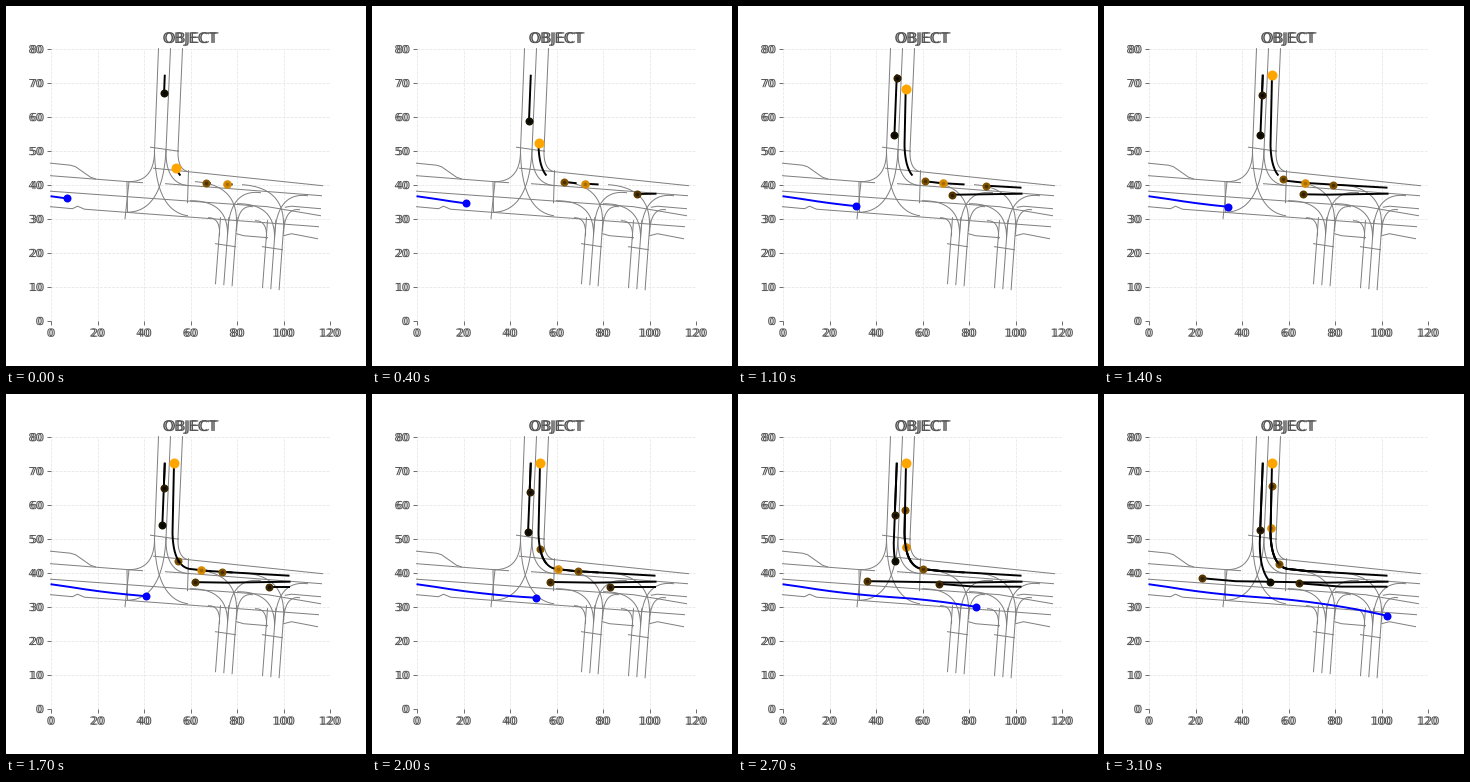
Animation of 360 by 360 pixels, one loop 3.2 s. Source, as a matplotlib script:

```python
import numpy as np
import matplotlib.pyplot as plt
from matplotlib.animation import FuncAnimation
from matplotlib.patheffects import PathPatchEffect

SIZE, DPI = 360, 100
FRAMES, STEP = 32, 100
INK = "#555555"
ROAD = "#808080"
DARK = "#7f5200"

fig = plt.figure(figsize=(SIZE / DPI, SIZE / DPI), dpi=DPI, facecolor="white")

# Chart frame: ticks, dashed grid and doubled lettering, no spines.
ax = fig.add_axes([0.125, 0.125, 0.775, 0.755])
ax.set(xlim=(0, 120), ylim=(0, 80))
ax.set_xticks(range(0, 121, 20))
ax.set_yticks(range(0, 81, 10))
ax.grid(color="#e6e6e6", linestyle="--", linewidth=0.55)
ax.tick_params(length=3, width=0.6, color=INK, labelcolor=INK, labelsize=8, pad=2.5)
ax.spines[:].set_visible(False)
title = ax.set_title("OBJECT", fontsize=10.5, color=INK, pad=4.5)
double = [PathPatchEffect(offset=(dx, 0), facecolor=INK, linewidth=0) for dx in (-0.7, 0.7)]
for text in (title, *ax.get_xticklabels(), *ax.get_yticklabels()):
    text.set_path_effects(double)

# Scene layer in stage pixels, y downwards.
scene = fig.add_axes([0, 0, 1, 1])
scene.set(xlim=(0.5, SIZE + 0.5), ylim=(SIZE + 0.3, 0.3))
scene.axis("off")


def curve(p, c, q):
    """Points of a turn from p to q, pulled towards c."""
    u = np.linspace(0, 1, 30)[:, None]
    p, c, q = map(np.array, (p, c, q))
    return (1 - u) ** 2 * p + 2 * u * (1 - u) * c + u * u * q


def road(*pts):
    scene.plot(*np.transpose(pts), color=ROAD, linewidth=0.72, zorder=1)


def bend(p, c, q):
    road(*curve(p, c, q))


# Main road
road((45, 157.5), (65, 159.5), (70, 161), (80, 168), (85, 171.5), (90, 173.2))
road((45, 170), (123, 176), (137, 177))
road((148, 162.5), (183, 166), (317, 180))
road((160, 178), (316, 190))
road((45, 185.5), (262, 201), (315, 210))
road((45, 201), (67, 203), (72, 200.5), (79, 203.5), (313, 221))
road((280, 201.5), (286, 200.5), (315, 203))
road((231, 228), (238, 230), (262, 232))
road((278, 230), (286, 228), (312, 233))

# Crossing and northern arm
road((122, 206.5), (121.5, 176))
road((123.5, 176), (119.5, 213))
road((183, 165), (182, 197))
road((145, 141.5), (173, 145.5))
for top, low in ((153, 149), (165, 160.5), (177, 172.5)):
    road((top, 43), (low, 145))
bend((149, 145), (149, 176), (123, 176))
bend((160.5, 145), (157, 206), (122, 206.5))
bend((149, 145), (150, 205), (182, 210))
bend((160.5, 145), (160, 178), (183, 180))
bend((172.5, 145), (172, 164), (183, 166))

# Two alike southern arms
for x, y, end in ((215, 215, 278), (262, 218, 282)):
    for i in range(3):
        road((x + 8.3 * i, y - 3), (x + 8.3 * i - 5, end + i))
    road((x - 5, y + 23), (x + 15, y + 26))
    bend((x - 12, y - 3), (x, y - 3), (x - 1, y + 15))
    bend((x - 30, y - 20), (x + 8, y - 20), (x + 7, y + 15))
    bend((x - 25, y - 39), (x + 16, y - 36), (x + 16, y))
    bend((x + 40, y - 28), (x + 8, y - 32), (x + 7, y + 15))
    bend((x + 32, y - 14), (x + 17, y - 16), (x + 16, y + 10))


class Lane:
    """A polyline that can be walked by distance."""

    def __init__(self, *pts):
        self.pts = np.array(pts, float)
        self.dist = np.r_[0, np.cumsum(np.hypot(*np.diff(self.pts, axis=0).T))]

    def upto(self, a, b):
        s = np.linspace(a, b, 150)
        return [np.interp(s, self.dist, col) for col in self.pts.T]


def ease(keys, t):
    """Distance at frame t, smooth and never backing up."""
    ts, ds = np.array(keys, float).T
    t = np.clip(t, ts[0], ts[-1])
    v = np.diff(ds) / np.diff(ts)
    mid = 2 * v[:-1] * v[1:] / (v[:-1] + v[1:])
    m = np.r_[v[0], mid, v[-1]]
    k = min(np.searchsorted(ts, t, side="right") - 1, len(v) - 1)
    h = ts[k + 1] - ts[k]
    u = (t - ts[k]) / h
    return (ds[k] + (ds[k + 1] - ds[k]) * u * u * (3 - 2 * u)
            + h * u * (1 - u) * (m[k] * (1 - u) - m[k + 1] * u))


class Mover:
    """A dot on a lane with its trail; keys are (frame, distance)."""

    def __init__(self, lane, keys, color, core=None, start=0, line="black", radius=4):
        self.lane, self.keys, self.start = lane, keys, start
        z = 4 if core is None else 3
        self.trail, = scene.plot([], [], color=line, linewidth=1.4, zorder=z - 0.5,
                                 solid_capstyle="butt")
        size = radius * 2 * 72 / DPI
        self.dots = [scene.plot([], [], "o", ms=s, color=c, mew=0, zorder=z, snap=False)[0]
                     for s, c in ((size, color), (size * 0.45, core or color))]

    def show(self, frame):
        seen = frame >= self.keys[0][0]
        x, y = self.lane.upto(self.start, ease(self.keys, frame)) if seen else ([], [])
        self.trail.set_data(x, y)
        for dot in self.dots:
            dot.set_data(x[-1:], y[-1:])
        return [self.trail, *self.dots]


turn = Lane((284, 182), (205, 177.5), *curve((186, 175.5), (168, 174), (167, 140)),
            (168.5, 69.5))
south = Lane((159.3, 69), *curve((156.3, 145), (155.5, 176), (166.5, 188)))
west = Lane((285, 188), (226, 189), (180, 188.3), (132, 187.5), (98.5, 184.5))
side = Lane((284, 193), (238, 193), (200, 190), (194, 189))
east = Lane((45, 190.5), *curve((61, 192.7), (110, 201), (163.5, 204)),
            *curve((164, 204), (230, 209.5), (283, 222)))

movers = [
    Mover(south, [(0, 18), (4, 46), (9, 60), (15, 60.5), (20, 69), (27, 98), (31, 122.5)],
          "#141000", "#080600"),
    Mover(south, [(11, 3), (14, 20.5), (20, 29.5), (31, 67)], "#2b1c00", "#0c0800"),
    Mover(west, [(2, 3), (9, 58.5), (14, 85.5), (20, 106.5), (31, 186.7)],
          "#553700", "#2e1e00"),
    Mover(side, [(15, 2.5), (20, 45.5), (27, 83), (31, 89)], "#402a00", "#1c1200"),
    Mover(turn, [(7, 5), (14, 54.5), (20, 77.6), (31, 110)], DARK, "#4a3000"),
    Mover(turn, [(0, 83.6), (4, 91.6), (9, 93.6), (14, 105), (20, 126.7), (31, 190.2)],
          DARK, "#4a3000", start=79),
    Mover(turn, [(0, 62.6), (4, 70.6), (14, 82.6), (20, 97.7), (31, 148.2)],
          "#d88c00", "#a86c00", start=57, radius=4.3),
    Mover(turn, [(0, 119.8), (4, 145.2), (9, 185.7), (13, 212.7)],
          "#ffa500", start=111, radius=5),
    Mover(east, [(0, 16.3), (4, 50.4), (9, 70), (14, 80), (20, 120), (31, 241)],
          "#0000ff", line="#0000ff"),
]


def draw(frame):
    return [artist for m in movers for artist in m.show(frame)]


anim = FuncAnimation(fig, draw, frames=FRAMES, interval=STEP, repeat=True, repeat_delay=0)
plt.show()
```
